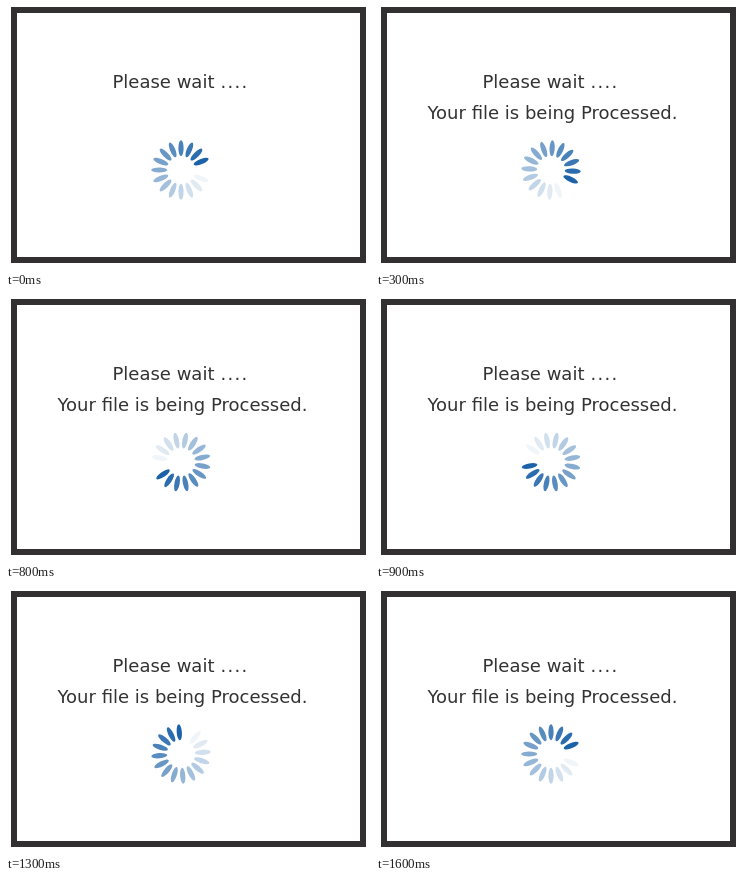
An HTML page for the animation above (1.7 s loop, 364 px wide and 264 px high).

```html
<!DOCTYPE html>
<html lang="en">
<head>
<meta charset="utf-8">
<title>Please wait</title>
<style>
  html, body { margin: 0; width: 100%; height: 100%; overflow: hidden; background: #fff; }
  svg { display: block; width: 364px; height: 264px; }
  text { font: 18px "DejaVu Sans", sans-serif; fill: #333; }
</style>
</head>
<body>
<svg viewBox="0 0 364 264">
  <rect x="8" y="4" width="349" height="250" fill="#fff" stroke="#333031" stroke-width="6"/>
  <text x="106.5" y="82">Please wait</text>
  <text x="214.5" y="82" letter-spacing="1.3">....</text>
  <text id="status" x="51.5" y="113">Your file is being Processed.</text>
  <g id="spinner"></g>
</svg>
<script>
  const LOOP = 1700, STEP = 100, BLADES = 16, TURN = 24;
  const DARK = [28, 98, 168];
  const spinner = document.getElementById("spinner");
  const status = document.getElementById("status");

  const fade = k => `rgb(${DARK.map(c => Math.round(c + (255 - c) * k))})`;

  for (let i = 0; i < BLADES; i++) {
    const blade = document.createElementNS("http://www.w3.org/2000/svg", "ellipse");
    const attrs = {
      cx: 21.8, rx: 8, ry: 2.6,
      fill: fade(i / (BLADES - 1)),
      transform: `rotate(${-(i + 1) * 360 / BLADES})`
    };
    for (const name in attrs) blade.setAttribute(name, attrs[name]);
    spinner.append(blade);
  }

  function draw(ms) {
    const step = Math.floor((ms % LOOP) / STEP);
    // The first step only reveals the status line; the turn starts after it.
    const angle = Math.max(0, step - 1) * TURN;
    status.setAttribute("visibility", step ? "visible" : "hidden");
    spinner.setAttribute("transform", `translate(175 164) rotate(${angle})`);
  }

  const start = performance.now();
  function tick() {
    draw(performance.now() - start);
    requestAnimationFrame(tick);
  }
  draw(0);
  requestAnimationFrame(tick);
</script>
</body>
</html>
```
